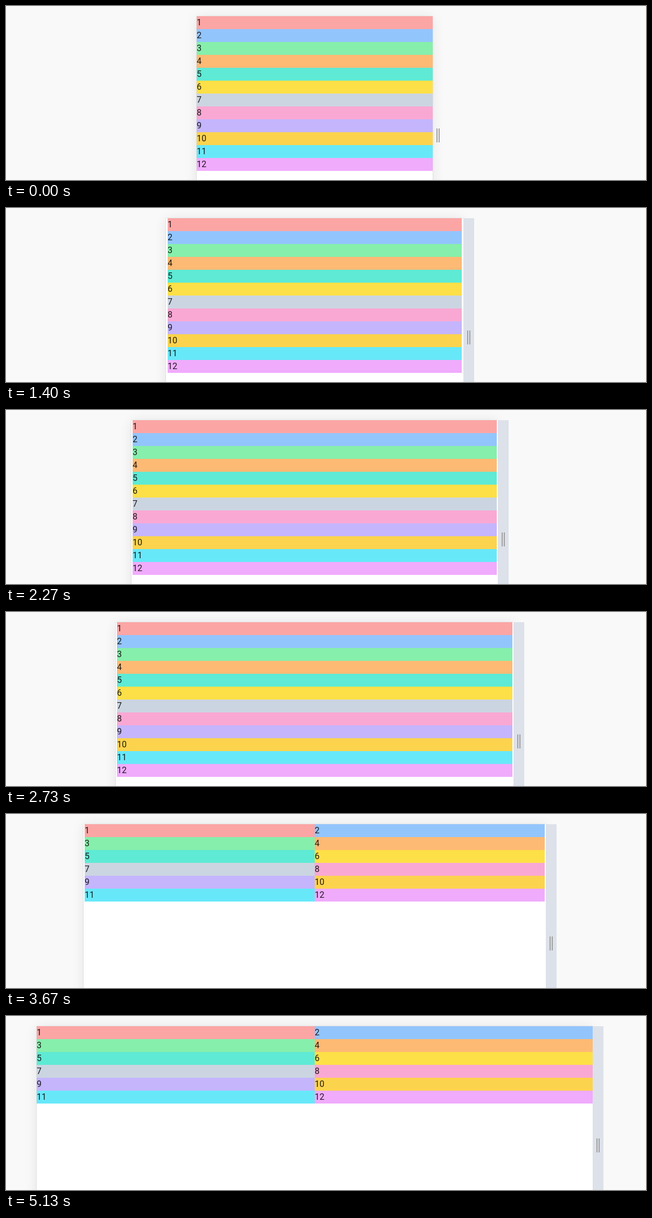
An HTML page for the animation above (5.67 s loop, 1188 by 324 pixels).

```html
<!DOCTYPE html>
<html lang="en">
<head>
<meta charset="utf-8">
<title>Responsive grid</title>
<style>
  html, body { margin: 0; width: 100%; height: 100%; overflow: hidden; background: #f9f9f9; }
  body { position: relative; font: 16px/24px Roboto, sans-serif; color: rgba(0, 0, 0, .87); }
  #panel, #handle, #grid { position: absolute; top: 19px; }
  #panel {
    height: 400px;
    background: #fff;
    box-shadow: 0 0 1px rgba(0, 0, 0, .3), 0 2px 22px rgba(0, 0, 0, .09);
  }
  #grid { display: grid; }
  #handle { width: 20px; height: 400px; }
  #handle.active { background: #dde1e9; }
  #handle::before {
    content: "";
    position: absolute;
    left: 7px;
    top: 209px;
    width: 2px;
    height: 26px;
    border: solid #a0a0a2;
    border-width: 0 2px;
  }
</style>
</head>
<body>
<div id="panel"></div>
<div id="grid"></div>
<div id="handle"></div>
<script>
  const LOOP = 5670, STEP = 200 / 3, CENTER = 573;
  const HOVER_AT = 399, LAYOUT_DELAY = 31, TWO_COLUMNS_FROM = 768;
  const COLORS = ["#fca5a5", "#93c5fd", "#86efac", "#fdba74", "#5eead4", "#fde047",
                  "#cbd5e1", "#f9a8d4", "#c4b5fd", "#fcd34d", "#67e8f9", "#f0abfc"];
  // Where the drag changes speed: [time in ms, half of the panel width]
  const DRAG = [[600, 219], [950, 234.8], [1200, 256], [1700, 305],
                [3000, 386], [4333, 472], [5050, 516]];

  const [panel, grid, handle] = ["panel", "grid", "handle"].map(id => document.getElementById(id));

  COLORS.forEach((color, i) => {
    const cell = document.createElement("div");
    cell.textContent = i + 1;
    cell.style.background = color;
    grid.append(cell);
  });

  // Each leg of the drag adds its share of the width, clamped to its own time span.
  function halfWidth(t) {
    let width = DRAG[0][1];
    for (let i = 1; i < DRAG.length; i++) {
      const [t0, w0] = DRAG[i - 1], [t1, w1] = DRAG[i];
      width += (w1 - w0) * Math.min(1, Math.max(0, (t - t0) / (t1 - t0)));
    }
    return Math.round(width);
  }

  function place(element, half) {
    element.style.left = CENTER - half + "px";
    element.style.width = 2 * half + "px";
  }

  function draw() {
    const now = performance.now() % LOOP;
    const t = Math.floor((now + 5) / STEP) * STEP % LOOP;
    const outer = halfWidth(t), inner = halfWidth(t - LAYOUT_DELAY);
    place(panel, outer);
    place(grid, inner);
    grid.style.gridTemplateColumns = 2 * inner >= TWO_COLUMNS_FROM ? "1fr 1fr" : "1fr";
    handle.style.left = CENTER + outer + "px";
    handle.classList.toggle("active", t > HOVER_AT);
    requestAnimationFrame(draw);
  }
  draw();
</script>
</body>
</html>
```
